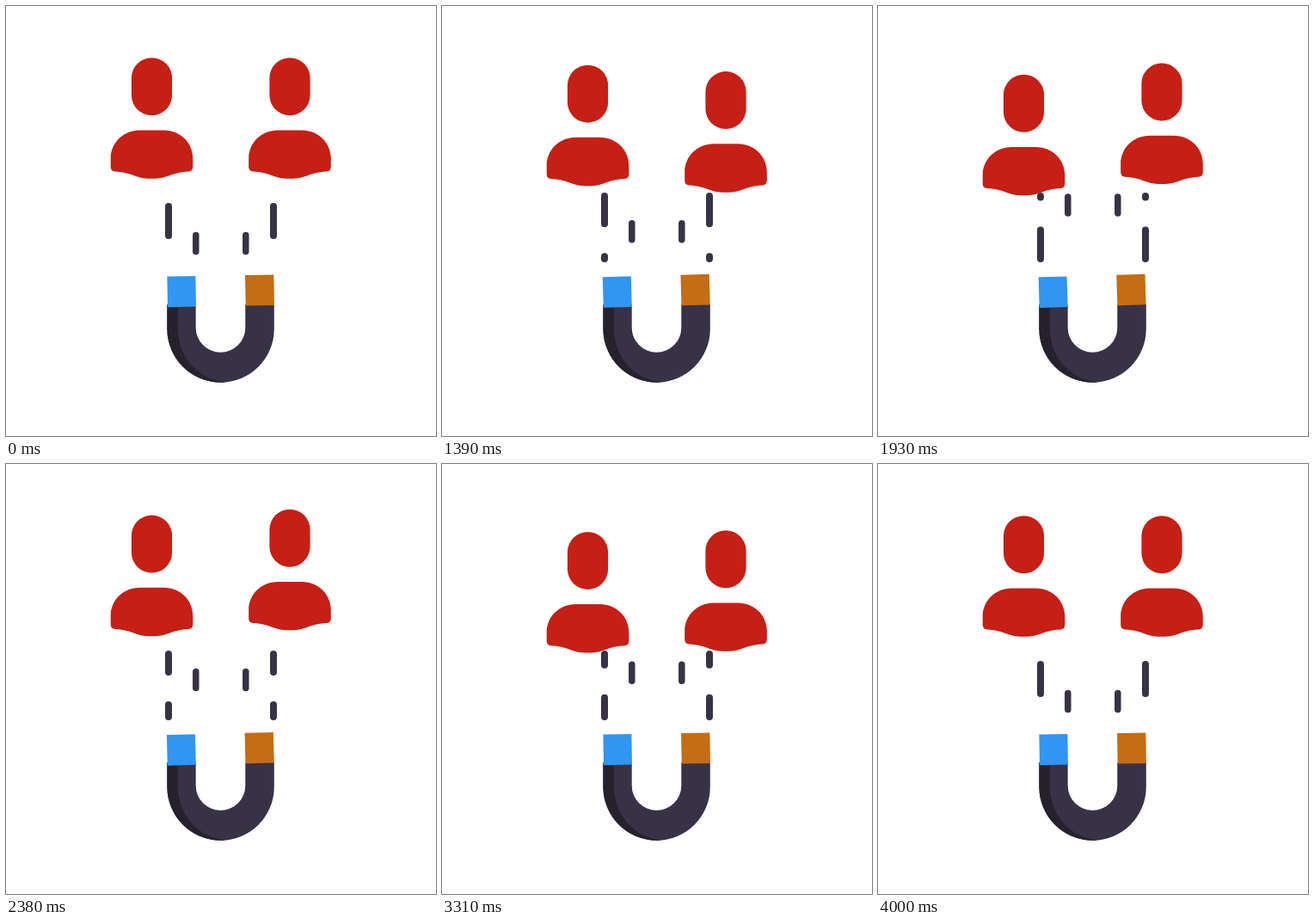
Recreate the animation shown at these times as an HTML page. Size 500 by 500 pixels, loop 4.12 s.

```html
<!DOCTYPE html>
<html lang="en">
<head>
<meta charset="utf-8">
<title>Magnet</title>
<style>
html, body { margin: 0; width: 100%; height: 100%; overflow: hidden; background: #fff; }
svg { display: block; width: 100%; height: 100%; }
.person { fill: #c61f15; }
.ray { fill: none; stroke: #383246; stroke-linecap: round; }
.outer { stroke-width: 8; stroke-dasharray: 34 38; }
.inner { stroke-width: 7.5; stroke-dasharray: 19 53; }
</style>
</head>
<body>
<svg viewBox="0 0 500 500">
  <defs>
    <g id="person">
      <rect x="-23.6" y="60.2" width="47.2" height="67" rx="23.6"/>
      <path d="M-14 144.400H14C33 144.400 47.800 159 47.800 177V187Q47.800 192 42.500 192.500C20 194 20 200.800 0 200.800S-20 194 -42.500 192.500Q-47.800 192 -47.800 187V177C-47.800 159 -33 144.400 -14 144.400Z"/>
    </g>
  </defs>

  <path class="ray outer" d="M189 221V294"/>
  <path class="ray outer" d="M311 221V294"/>
  <path class="ray inner" d="M220.800 221V286"/>
  <path class="ray inner" d="M278.800 221V286"/>

  <path fill="#383246" d="M187.400 347H220.700V374A28.800 28.800 0 0 0 278.300 374V347H311.800V375.500A62.200 62.200 0 0 1 187.400 375.500Z"/>
  <path fill="#26222d" d="M187.400 347H200V376A60 62 0 0 0 255 437.400A62.200 62.200 0 0 1 187.400 375.500Z"/>
  <g id="tips">
    <rect x="188.500" y="313.500" width="33" height="35.600" fill="#3195f2"/>
    <rect x="279.200" y="313.500" width="33.300" height="35.600" fill="#c46d14"/>
  </g>

  <use id="left" class="person" href="#person" x="169.500"/>
  <use id="right" class="person" href="#person" x="330"/>
</svg>
<script>
const LOOP = 4120, START = 1000, END = 4000, STEP = 30;
const PERIOD = 72, HALF_SWING = 770;

// Smooth 0 to 1 between two times
function ease(t, from, to) {
  const u = Math.min(1, Math.max(0, (t - from) / (to - from)));
  return u * u * (3 - 2 * u);
}

function bezier(x1, y1, x2, y2) {
  const curve = (a, b, s) => 3 * a * s * (1 - s) ** 2 + 3 * b * s * s * (1 - s) + s ** 3;
  return x => {
    let lo = 0, hi = 1;
    for (let i = 0; i < 24; i++) {
      const mid = (lo + hi) / 2;
      if (curve(x1, x2, mid) < x) lo = mid; else hi = mid;
    }
    return curve(y1, y2, lo);
  };
}

// Down, up past the rest height, down again, then back to rest
function bob(t, peak) {
  const top = peak + HALF_SWING, low = top + HALF_SWING;
  return 20 * ease(t, START, peak) - 28 * ease(t, peak, top)
    + 28 * ease(t, top, low) - 20 * ease(t, low, END);
}

const tilt = t => -1 - 0.75 * (ease(t, START, 1600) - ease(t, 1700, 3250));

// The dashes run six periods towards the magnet
const flowEase = bezier(0.2, 0.11, 0.56, 1);
const flow = t => 6 * PERIOD * flowEase((t - START) / (END - START));

const byId = id => document.getElementById(id);
const left = byId("left"), right = byId("right"), tips = byId("tips");
const outer = document.querySelectorAll(".outer");
const inner = document.querySelectorAll(".inner");

function setOffset(lines, start, shift) {
  for (const line of lines) line.style.strokeDashoffset = PERIOD - (start + shift) % PERIOD;
}

function draw(now) {
  const frame = Math.floor((now % LOOP - START) / STEP + 1e-6);
  const t = Math.min(END, START + Math.max(0, frame) * STEP);
  left.setAttribute("transform", `translate(0 ${bob(t, 1870)})`);
  right.setAttribute("transform", `translate(0 ${bob(t, 1550)})`);
  tips.setAttribute("transform", `rotate(${tilt(t)} 250 378)`);
  const shift = flow(t);
  setOffset(outer, 12, shift);
  setOffset(inner, 45.5, shift);
}

const origin = performance.now();
function tick() {
  draw(performance.now() - origin);
  requestAnimationFrame(tick);
}
tick();
</script>
</body>
</html>
```
